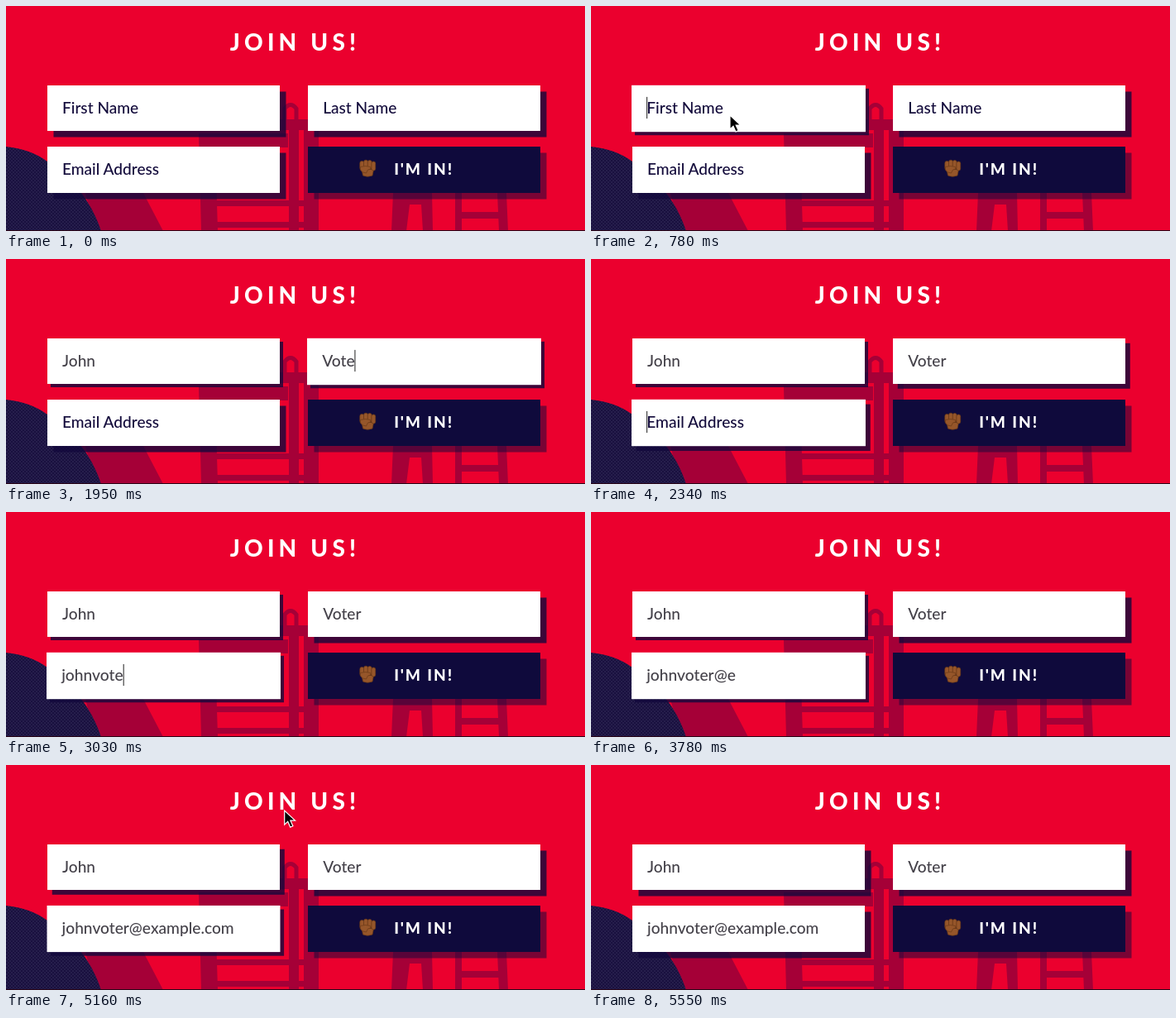
An HTML page for the animation above (6050 ms loop, 700 by 272 pixels).

```html
<!DOCTYPE html>
<html lang="en">
<head>
<meta charset="utf-8">
<title>Join us</title>
<style>
  html, body { margin: 0; width: 100%; height: 100%; overflow: hidden; background: #eb002e; }
  body { position: relative; font: 500 19.1px/54px Lato, sans-serif; color: #140c3c; }
  svg { position: absolute; left: 0; top: 0; }
  .box { position: absolute; width: 280.5px; height: 55.5px; box-sizing: border-box; white-space: pre; }
  .field { background: #fff; padding-left: 18px; }
  .left { left: 50px; }
  .right { left: 365.2px; }
  .top { top: 95.5px; }
  .bottom { top: 170px; }
  .button { background: #0f0a3c; color: #fff; padding-left: 104px; font-weight: 800; letter-spacing: 1.9px; box-shadow: 7.5px 7.5px rgba(18, 8, 60, .52); }
  .caret { display: inline-block; height: 26px; border-left: 1px solid #222; margin-right: -1px; vertical-align: -6px; }
  h1 { position: absolute; left: 0; top: 23px; width: 699px; margin: 0; text-align: center; color: #fff; font: 800 28px/40px Lato, sans-serif; letter-spacing: 5.2px; }
</style>
</head>
<body>
<svg width="700" height="272">
  <defs>
    <pattern id="dots" width="4" height="4" patternUnits="userSpaceOnUse">
      <path d="M0 0h4v4h-4z" fill="#19103f"/>
      <circle cx="1" cy="1" r=".8" fill="#35305c"/>
      <circle cx="3" cy="3" r=".8" fill="#35305c"/>
    </pattern>
  </defs>
  <g fill="#a50037">
    <path d="M96 226h70l24 46h-82z"/>
    <path d="M233 154h108v17h-88l3 101h-20z"/>
    <path d="M250 235h128v7h-128zM250 261h128v7h-128z"/>
    <path d="M331 137h50v13h-50zM342 150h12v122h-12zM360 150h18v122h-18z"/>
    <path d="M337 140v-16q7-9 14 0v16" fill="none" stroke="#a50037" stroke-width="5"/>
    <path d="M468 226h47l1 46h-12l-2-32h-14l-4 32h-18z"/>
    <path d="M543 226h8v46h-8zM594 226h11l2 46h-11zM547 249h52v8h-52z"/>
  </g>
  <path d="M0 170Q30 173 50 188 98 220 115 272H0z" fill="url(#dots)"/>
  <path d="M0 271.5h700" stroke="#2a0618"/>
</svg>

<h1>JOIN US!</h1>
<div class="box field left top"></div>
<div class="box field right top"></div>
<div class="box field left bottom"></div>
<div class="box button right bottom">I'M IN!</div>

<svg width="700" height="272">
  <g transform="translate(427 185.500)" stroke="#6b3a17" stroke-width=".7" fill="#96562a">
    <path d="M3 12h14.500l-1.500 7.500q-6 2.500-11.500 0z"/>
    <rect x=".8" y="2" width="5" height="11" rx="2.4"/>
    <rect x="5.5" y=".7" width="5" height="11" rx="2.4"/>
    <rect x="10.2" y="1" width="5" height="11" rx="2.4"/>
    <rect x="14.9" y="2.5" width="4.8" height="11" rx="2.3"/>
    <path d="M1.500 9q6-2 12 0 1 3-3 3.500l-2 4q-5 0-7-4z"/>
  </g>
  <path id="cursor" d="M0 0V17l4-3.800 3 6.800 3.200-1.400-3-6.600h5.600z" stroke="#fff" stroke-width="1.200"/>
</svg>

<script>
const LOOP = 6050;
const boxes = document.querySelectorAll('.field');
const cursor = document.getElementById('cursor');

// keys: [time, characters typed]
const fields = [
  { label: 'First Name', text: 'John', focus: 690, blur: 1470, keys: [[900, 0], [1350, 4]] },
  { label: 'Last Name', text: 'Voter', focus: 1470, blur: 2250, keys: [[1590, 0], [2130, 5]] },
  { label: 'Email Address', text: 'johnvoter@example.com', focus: 2250, blur: 5130,
    keys: [[2430, 0], [3270, 11], [3810, 11], [4440, 21]] }
];
const hover = { on: 480, off: 5070 };
const path = [
  [90, 235, -22], [570, 170, 128], [690, 168, 132], [4500, 168, 132],
  [4800, 322, 111], [5040, 329, 101], [5370, 350, -24]
];

const ramp = (t, start, length) => Math.min(1, Math.max(0, (t - start) / length));
const pulse = (t, on, off, length) => ramp(t, on, length) - ramp(t, off, length);

function track(keys, t, column = 1) {
  let value = keys[0][column];
  for (let i = 1; i < keys.length; i++) {
    const [a, b] = [keys[i - 1], keys[i]];
    value += (b[column] - a[column]) * ramp(t, a[0], b[0] - a[0]);
  }
  return value;
}

function caretVisible({ focus, blur, keys }, t) {
  if (t < focus || t >= blur) return false;
  const marks = [focus, ...keys.map(k => k[0])].filter(m => m <= t);
  const typing = keys.some((k, i) => i && t > keys[i - 1][0] && t < k[0] && k[1] > keys[i - 1][1]);
  return typing || (t - Math.max(...marks)) % 1000 < 500;
}

function drawField(field, i, t) {
  const count = Math.ceil(track(field.keys, t) - 1e-6);
  const caret = caretVisible(field, t) ? '<i class="caret"></i>' : '';
  const { style } = boxes[i];
  boxes[i].innerHTML = count ? field.text.slice(0, count) + caret : caret + field.label;
  style.color = count ? '#45424a' : '';
  style.transform = `scale(${1 + .007 * pulse(t, field.focus, field.blur, 60)})`;

  const focused = pulse(t, field.focus, field.blur, 180);
  const hovered = i ? 0 : pulse(t, hover.on, hover.off, 180);
  const depth = 7.5 - 3.5 * Math.max(focused, hovered);
  style.boxShadow = `${depth}px ${depth}px rgba(18, 8, 60, .8)`;
}

function draw(now) {
  const t = now % LOOP;
  fields.forEach((field, i) => drawField(field, i, t));
  cursor.setAttribute('transform', `translate(${track(path, t, 1)} ${track(path, t, 2)})`);
  cursor.style.display = t > 900 && t < 4500 ? 'none' : '';
  requestAnimationFrame(draw);
}
requestAnimationFrame(draw);
</script>
</body>
</html>
```
